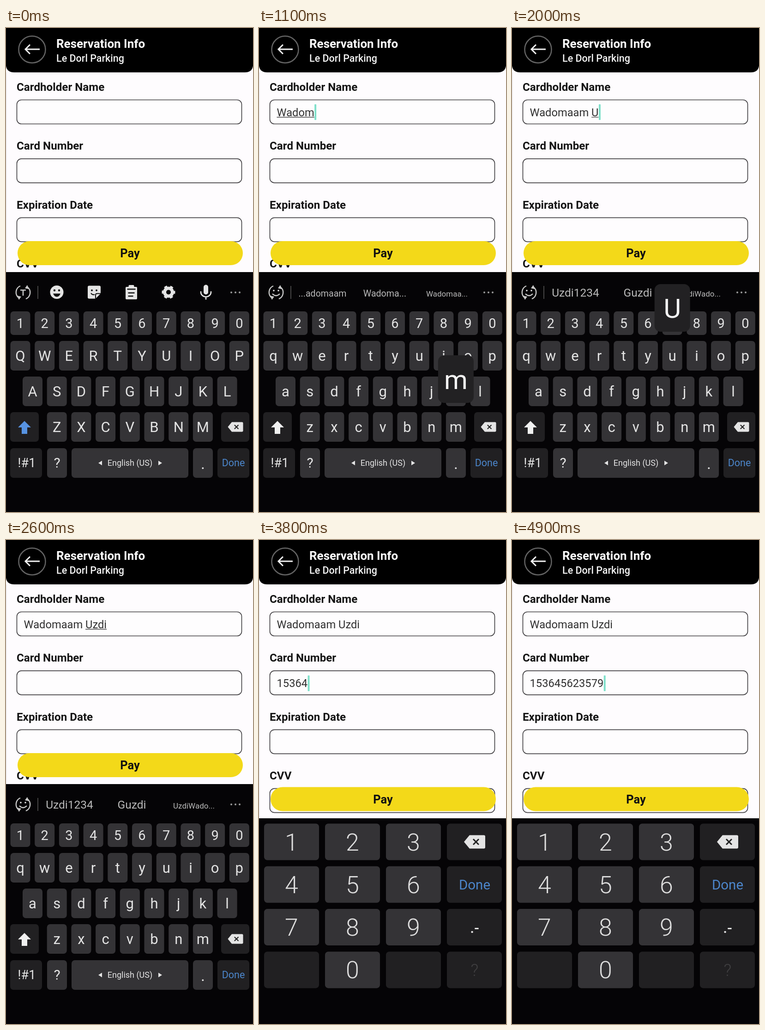
An HTML page for the animation above (5000 ms loop, 535x1047 px).

```html
<!DOCTYPE html>
<html lang="en">
<head>
<meta charset="utf-8">
<style>
  html, body { margin: 0; width: 100%; height: 100%; overflow: hidden; background: #050406; }
  svg { display: block; width: 100%; height: 100%; font-family: Roboto, sans-serif; }
</style>
</head>
<body>
<svg id="stage" viewBox="0 0 535 1047"></svg>
<script>
const LOOP = 5000, SWITCH = 2900, STEP = 52.7;
const KEY = '#343336', DARK = '#212022', INK = '#e4e4e4', BLUE = '#4c86cb';
const NAME = 'Wadomaam Uzdi', CARD = '153645623579';
const NAME_TIMES = [300, 500, 700, 900, 1100, 1200, 1300, 1500, 1600, 2000, 2100, 2200, 2400];
const CARD_TIMES = [3100, 3300, 3400, 3600, 3700, 3900, 4000, 4200, 4300, 4500, 4600, 4800];
const ROWS = [
  { keys: '1234567890', x: 31, y: 613, h: 51, size: 29, base: 649 },
  { keys: 'qwertyuiop', x: 31, y: 677, h: 64, size: 31, base: 720 },
  { keys: 'asdfghjkl', x: 57.5, y: 754, h: 64, size: 31, base: 797 },
  { keys: 'zxcvbnm', x: 110.2, y: 831, h: 64, size: 31, base: 874 }
];
// Suggestions: text and size for each of the three slots.
const FIRST = [['...adomaam', 19.6], ['Wadoma...', 19.6], ['Wadomaa...', 17]];
const NEXT = [['Noubrem', 24.5], ['was', 24.5], ['is', 24.5]];
const LAST = [['Uzdi1234', 24.5], ['Guzdi', 24.5], ['UzdiWado...', 17]];

const pen = document.createElement('canvas').getContext('2d');
pen.font = '23.7px Roboto, sans-serif';
const width = s => pen.measureText(s).width;
const typed = (s, times, t) => s.slice(0, times.filter(k => k <= t).length);

const box = (x, y, w, h, r, fill, extra = '') =>
  `<rect x="${x}" y="${y}" width="${w}" height="${h}" rx="${r}" fill="${fill}" ${extra}/>`;
const text = (s, x, y, size, fill = INK, weight = 400, anchor = 'middle') =>
  `<text x="${x}" y="${y}" font-size="${size}" fill="${fill}" font-weight="${weight}" text-anchor="${anchor}">${s}</text>`;
const path = (d, fill, stroke = 'none', w = 1, extra = '') =>
  `<path d="${d}" fill="${fill}" stroke="${stroke}" stroke-width="${w}" ${extra}/>`;
const dot = (x, y, r, fill = INK, extra = '') =>
  `<circle cx="${x}" cy="${y}" r="${r}" fill="${fill}" ${extra}/>`;
const at = (x, y, s, k = 1) => `<g transform="translate(${x} ${y}) scale(${k})">${s}</g>`;

function header() {
  return path('M0 0H535V82Q533 96 517 96H18Q2 96 0 82Z', '#000') +
    dot(56.5, 46.5, 29, 'none', 'stroke="#636363" stroke-width="2.5"') +
    path('M73 46H43M52 36L42 46L52 56', 'none', '#f2f2f2', 3) +
    text('Reservation Info', 109, 43, 26, '#fff', 700, 'start') +
    text('Le Dorl Parking', 109, 73, 21.5, '#f4f4f4', 500, 'start');
}

function form(name, card, t) {
  let s = '';
  ['Cardholder Name', 'Card Number', 'Expiration Date', 'CVV'].forEach((label, i) => {
    const y = i * 127.4;
    s += text(label, 23, 136 + y, 24.2, '#151515', 600, 'start') +
      box(23.5, 155.5 + y, 487, 52, 10, '#fefdfe', 'stroke="#454346" stroke-width="1.7"');
  });
  const value = (v, y) => text(v, 38.5, y, 23.7, '#303030', 400, 'start');
  s += value(name, 190.5) + value(card, 318);

  const onCard = t >= SWITCH;
  const start = name.length > 9 ? 9 : 0;
  if (!onCard && name && name.length !== 9) {
    const x = 38.5 + width(name.slice(0, start));
    s += path(`M${x} 193H${38.5 + width(name)}`, 'none', '#444', 1.3);
  }
  if (onCard || (t >= 100 && t < 2500))
    s += box(39 + width(onCard ? card : name), onCard ? 293 : 165, 4, 34, 1, '#80e0ca');
  return s;
}

function payButton(y) {
  return box(25, y, 488, 52, 26, '#f3d919') + text('Pay', 268.5, y + 35, 25.5, '#111', 700);
}

const backspace = path('M-23 0L-11-14.5H20Q23-14.5 23-11.5V11.5Q23 14.5 20 14.5H-11Z', INK) +
  path('M-3-6L9 6M9-6L-3 6', 'none', '#222', 3);

const spinner = path('M-6-14A15 15 0 0 0-9 12M6 14A15 15 0 0 0 9-12', 'none', '#c9c9c9', 2.4) +
  path('M-13 7L-4 9L-9 16ZM13-7L4-9L9-16Z', '#c9c9c9');

function toolIcons() {
  return at(37, 572, spinner + path('M-6-5H6M0-5V7', 'none', '#c9c9c9', 2.6)) +
    at(110, 571.5, dot(0, 0, 14.5) + dot(-5, -4, 2.2, '#111') + dot(5, -4, 2.2, '#111') +
      path('M-8 3H8Q5 10 0 10T-8 3', '#111')) +
    at(191, 571.5, path('M-11-14H11Q14-14 14-11V3L3 14H-11Q-14 14-14 11V-11Q-14-14-11-14Z', INK) +
      path('M3 14V6Q3 3 6 3H14', 'none', '#111', 2) + path('M-7 2Q-4 7 1 5', 'none', '#111', 2) +
      dot(-5, -4, 2, '#111') + dot(5, -4, 2, '#111')) +
    at(271.5, 572, box(-12.5, -12, 25, 27, 2, INK) + box(-6, -16, 12, 8, 2, INK) +
      path('M-9-7H9M-7 1H7M-7 8H4', 'none', '#111', 2.4)) +
    at(352, 571.5, dot(0, 0, 8.5, 'none', `stroke="${INK}" stroke-width="7"`) +
      dot(0, 0, 12, 'none', `stroke="${INK}" stroke-width="5" stroke-dasharray="6.283" stroke-dashoffset="3.14"`)) +
    at(433, 571.5, box(-5, -16, 10, 21, 5, INK) +
      path('M-11-2V0A11 10 0 0 0 11 0V-2M0 10V16', 'none', INK, 2.6));
}

function suggestions(words) {
  return at(37, 572, spinner + dot(-5, -4, 1.8) + dot(5, -4, 1.8) +
    path('M-8 3Q0 11 8 3', 'none', '#c9c9c9', 2.4)) +
    words.map(([s, size], i) => text(s, [137.5, 272.5, 407][i], 581, size, '#b9b9b9')).join('');
}

function letters(name, t) {
  const caps = !name || (t >= 1900 && t < 2000);
  let s = box(0, 528, 535, 519, 0, '#050406');
  s += name ? suggestions(name.length < 9 ? FIRST : name.length === 9 ? NEXT : LAST) : toolIcons();
  s += path('M69 558V586', 'none', '#444', 2) + [488, 497, 506].map(x => dot(x, 572, 2, '#9a9a9a')).join('');

  for (const r of ROWS)
    [...r.keys].forEach((c, i) => {
      const x = r.x + i * STEP;
      s += box(x - 21.5, r.y, 43, r.h, 7, KEY) + text(caps ? c.toUpperCase() : c, x, r.base, r.size);
    });

  s += box(9, 831, 62, 64, 7, DARK) +
    path('M40 850L54 864H46V878H34V864H26Z', caps ? '#5793e2' : '#f0f0f0') +
    box(466, 831, 61, 64, 7, DARK) + at(497, 863, backspace, .72) +
    box(9, 909, 69, 64, 7, DARK) + text('!#1', 45, 950, 27) +
    box(89, 909, 43, 64, 7, KEY) + text('?', 110.5, 951, 30) +
    box(142, 909, 253, 64, 7, KEY) + text('English (US)', 268.5, 947, 18) +
    path('M208 936V946L200 941ZM330 936V946L338 941Z', INK) +
    box(405, 909, 43, 64, 7, KEY) + text('.', 426.5, 954, 34) +
    box(458, 909, 69, 64, 7, DARK) + text('Done', 492.5, 948, 21.5, BLUE);

  const c = name.slice(-1);
  if (c.trim() && t < NAME_TIMES[name.length - 1] + 100) {
    const row = ROWS.find(r => r.keys.includes(c.toLowerCase()));
    const x = row.x + row.keys.indexOf(c.toLowerCase()) * STEP;
    s += box(x - 38.5, row.y - 123, 77, 103, 13, '#222123') + text(c, x, row.y - 50, 58, '#f4f4f4');
  }
  return s;
}

function keypad() {
  let s = box(0, 602, 535, 445, 0, '#050406');
  for (let i = 0; i < 16; i++) {
    const col = i % 4, row = i >> 2, x = 11 + col * 132, y = 613.5 + row * 92.3;
    const digit = '123 456 789  0  '[i].trim();
    s += box(x, y, 119, 79, 7, digit ? KEY : DARK);
    if (digit) s += text(digit, x + 59.5, y + 58, 52, '#dedede', 300);
  }
  return s + at(467, 653, backspace) + text('Done', 467, 756, 29.5, BLUE) +
    text('.-', 467, 850, 32, INK, 500) + text('?', 467, 943, 37, '#403f41', 300);
}

const stage = document.getElementById('stage');
let shown = '';
function draw() {
  const t = performance.now() % LOOP;
  const name = typed(NAME, NAME_TIMES, t), card = typed(CARD, CARD_TIMES, t);
  const pad = t >= SWITCH;
  const picture = box(0, 0, 535, 1047, 0, '#fefcfe') + box(0, 96, 2, 506, 0, '#f0eff1') +
    header() + form(name, card, t) + payButton(pad ? 534.5 : 461) +
    (pad ? keypad() : letters(name, t));
  if (picture !== shown) stage.innerHTML = shown = picture;
  requestAnimationFrame(draw);
}
draw();
</script>
</body>
</html>
```
